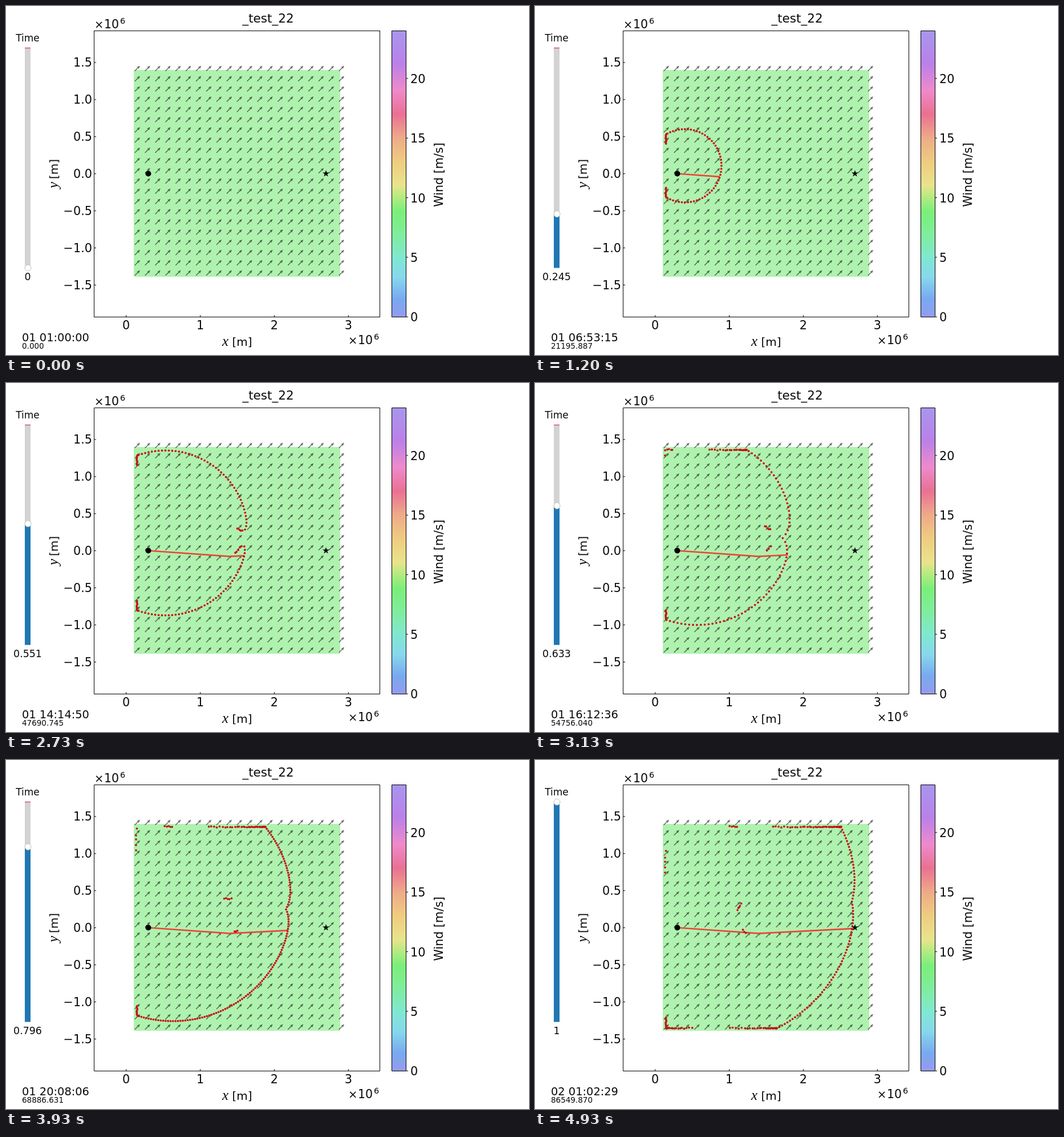
An HTML page with a canvas that plays this animation: 917 by 611 pixels, repeating every 5060 ms.

```html
<!DOCTYPE html>
<html lang="en">
<head>
<meta charset="utf-8">
<title>Wind routing front</title>
<style>
html, body { margin: 0; width: 100%; height: 100%; overflow: hidden; background: #fff; }
canvas { display: block; }
</style>
</head>
<body>
<canvas id="stage" width="917" height="611"></canvas>
<script>
const ctx = document.getElementById('stage').getContext('2d');
const LOOP = 5060, LAST = 49, DURATION = 86549.870;
const SANS = '"DejaVu Sans", sans-serif';
const MATH = 'italic 25px "Liberation Serif", serif';
const START = { x: 249.5, y: 293.5 }, GOAL = { x: 561, y: 293.5 };
const AREA = { left: 231, top: 116.8, bottom: 470 };
const UNIT = 129.85;

function text(str, x, y, size, align = 'left', font = size + 'px ' + SANS) {
  ctx.font = font;
  ctx.textAlign = align;
  ctx.fillStyle = '#0a0a0a';
  ctx.fillText(str, x, y);
}

function rotated(x, y, draw) {
  ctx.save();
  ctx.translate(x, y);
  ctx.rotate(-Math.PI / 2);
  draw();
  ctx.restore();
}

function line(x1, y1, x2, y2, color = '#000', width = 1) {
  ctx.strokeStyle = color;
  ctx.lineWidth = width;
  ctx.beginPath();
  ctx.moveTo(x1, y1);
  ctx.lineTo(x2, y2);
  ctx.stroke();
}

function disc(x, y, r, color) {
  ctx.fillStyle = color;
  ctx.beginPath();
  ctx.arc(x, y, r, 0, 2 * Math.PI);
  ctx.fill();
}

const dot = (x, y) => disc(x, y, 1.85, '#cb0c16');
const clamp = (v, low, high) => Math.max(low, Math.min(high, v));

// Repeatable offset in -1..1
function noise(i) {
  const s = Math.sin(i * 91.7 + 3.1) * 4375.5;
  return 2 * (s - Math.floor(s)) - 1;
}

function frameBox(x, y, w, h) {
  ctx.strokeStyle = '#000';
  ctx.lineWidth = 1;
  ctx.strokeRect(x, y, w, h);
}

function powerOfTen(x, y) {
  text('×', x - 2, y, 19.5);
  text('10', x + 15, y, 20.5);
  text('6', x + 43, y - 8, 14.5);
}

function drawArrows() {
  ctx.fillStyle = 'rgba(0, 0, 0, 0.58)';
  for (let row = 0; row < 21; row++) {
    for (let col = 0; col < 21; col++) {
      ctx.save();
      ctx.translate(225.8 + 17.9 * col, 113.8 + 17.9 * row);
      ctx.rotate(-Math.PI / 4);
      ctx.beginPath();
      ctx.moveTo(0, -0.7);
      ctx.lineTo(8.2, -0.7);
      ctx.lineTo(7.2, -2.5);
      ctx.lineTo(13, 0);
      ctx.lineTo(7.2, 2.5);
      ctx.lineTo(8.2, 0.7);
      ctx.lineTo(0, 0.7);
      ctx.fill();
      ctx.restore();
    }
  }
}

function drawColorbar() {
  const shade = ctx.createLinearGradient(0, 544, 0, 43);
  const stops = ['#949bee', '#78a9f0', '#86d8ec', '#80e8d0', '#7fed9a', '#7aef79',
    '#a8ec80', '#e8e48a', '#efcc80', '#eeaa88', '#ea7093', '#ee8acb', '#bb80e8', '#a796ee'];
  const values = [0, 1.5, 3.3, 5, 7, 8.8, 9.8, 11, 13, 15, 17, 19, 21.2, 24];
  stops.forEach((c, i) => shade.addColorStop(values[i] / 24, c));
  ctx.fillStyle = shade;
  ctx.fillRect(676.5, 43.5, 25, 501);
  frameBox(676.5, 43.5, 25, 501);
  for (let v = 0; v <= 20; v += 5) {
    const y = 544.3 - 20.87 * v;
    line(702, y, 705, y);
    text(v, 709, y + 8, 20.8);
  }
  rotated(766, 295.5, () => text('Wind [m/s]', 0, 0, 20.7, 'center'));
}

function drawChart() {
  ctx.fillStyle = '#fff';
  ctx.fillRect(0, 0, 917, 611);
  ctx.fillStyle = '#aff2af';
  ctx.fillRect(224, 112, 362, 362);
  drawArrows();
  frameBox(154.5, 43.5, 501, 501);
  for (let i = 0; i <= 3; i++) {
    const x = 210.7 + UNIT * i;
    line(x, 544, x, 541);
    text(i, x, 565.5, 20.8, 'center');
  }
  for (let i = -3; i <= 3; i++) {
    const y = 293.7 - UNIT * i / 2;
    line(155, y, 158, y);
    text((i / 2).toFixed(1).replace('-', '−'), 151, y + 7.5, 20.8, 'right');
  }
  powerOfTen(157, 39);
  powerOfTen(602, 592);
  text('_test_22', 459.5, 29, 21.5, 'center');
  text('x', 379, 595, 0, 'left', MATH);
  text('[m]', 396.5, 595, 20);
  rotated(91, 319, () => {
    text('y', 0, 0, 0, 'left', MATH);
    text('[m]', 16, 0, 20);
  });
  drawColorbar();
  text('Time', 38, 62, 17, 'center');
}

// Shortest decimal label that stays within a thousandth
function shortLabel(v) {
  let d = 3;
  while (d >= 0 && Math.abs(v - Number(v.toFixed(d))) < 1e-3) d--;
  return v.toFixed(d + 1);
}

function drawSlider(v) {
  const y = 458.5 - 385 * v;
  ctx.fillStyle = '#d3d3d3';
  ctx.fillRect(33, 73.5, 10, 385);
  line(33, 73.5, 43, 73.5, '#e0445f', 1.4);
  ctx.fillStyle = '#1f77b4';
  ctx.fillRect(33, y, 10, 458.5 - y);
  disc(38.5, y, 5.5, '#fff');
  ctx.strokeStyle = '#bfbfbf';
  ctx.lineWidth = 1;
  ctx.stroke();
  text(shortLabel(v), 38, 480, 17.4, 'center');
}

function drawClock(seconds) {
  const total = Math.floor(seconds) + 3600;
  const pad = n => String(Math.floor(n)).padStart(2, '0');
  const day = pad(1 + total / 86400);
  const clock = [total / 3600 % 24, total / 60 % 60, total % 60].map(pad).join(':');
  text(day + ' ' + clock, 28, 587, 19.4);
  text(seconds.toFixed(3), 28, 600, 13.5);
}

// Piecewise linear [x, y] from rows of [step, x, y]
function follow(keys, k) {
  let i = 0;
  while (i < keys.length - 2 && k > keys[i + 1][0]) i++;
  const a = keys[i], b = keys[i + 1], u = (k - a[0]) / (b[0] - a[0]);
  return [1, 2].map(j => a[j] + (b[j] - a[j]) * u);
}

// Dots shed where the front wraps around the calm spot
const UPPER = [
  [[19, 369, 254], [27, 414, 259], [35, 410, 254.5], [39, 395, 243], [49, 361, 252]],
  [[19, 363, 262], [27, 406, 254], [35, 401, 246], [39, 383, 242], [49, 355.5, 262]]
];
const LOWER = [
  [[19, 362.5, 285], [27, 401.5, 298], [35, 411, 290], [39, 400.5, 301], [49, 364, 298]],
  [[19, 369, 295], [27, 413.5, 285], [35, 414.5, 285], [39, 406, 298], [49, 370, 302]]
];

function drawShed([from, to], k, count) {
  const [ax, ay] = follow(from, k), [bx, by] = follow(to, k);
  for (let i = 0; i < count; i++) {
    const u = i / (count - 1);
    dot(ax + (bx - ax) * u + noise(i) * 0.6, ay + (by - ay) * u + noise(i + 9) * 0.9);
  }
}

// Row of dots along an edge, denser towards `dense`
function drawRow(sparse, dense, y, gap) {
  const n = Math.round(Math.abs(dense - sparse) / gap);
  for (let i = 0; i <= n; i++) {
    const u = 1 - (1 - i / n) ** 2;
    dot(sparse + (dense - sparse) * u + noise(i) * 0.9, y + noise(i + 40) * (1 - u) + noise(i + 70) * 0.4);
  }
}

function drawClump(y, dir, length) {
  for (let i = 0; i < 9; i++) {
    dot(229.8 + noise(i) * 0.8, y + dir * length * i / 8);
  }
}

function drawFront(k) {
  const cx = START.x + 1.11 * k, cy = START.y - 1.15 * k, r = 5.345 * k;
  const reach = d => Math.sqrt(Math.max(0, r * r - d * d));
  const count = Math.max(20, 76 * 2 ** Math.ceil(Math.log2(r / 84)));

  // The front splits on the calm spot, then closes to a notch that widens
  const split = k >= 16 && k < 31;
  const half = !split ? 0 : k < 19 ? 10 + (k - 16) * 3.3 : k < 27 ? 20 - (k - 19) * 0.75 : 14 - (k - 27) * 3.5;
  const mid = split ? 274 - (k - 19) * 0.4 : 266 - (k - 35) * 1.3;
  const depth = k < 31 ? clamp((k - 19) * 0.6, 0, 5) : clamp(15 - (k - 35) * 1.2, 10, 15);
  const width = split ? 8 : Math.max(16, 18 + (k - 39) * 2.5);

  for (let i = 0; i < count; i++) {
    const a = 2 * Math.PI * i / count;
    let x = cx + r * Math.cos(a);
    const y = cy + r * Math.sin(a);
    if (x < AREA.left || y < AREA.top || y > AREA.bottom) continue;
    if (x > cx) {
      const away = Math.abs(y - mid) - half;
      if (split && away < 0) continue;
      x -= depth * Math.exp(-Math.max(0, away) / width);
    }
    dot(x, y);
  }

  if (k >= 5) {
    const h = reach(cx - AREA.left), len = Math.min(17, h * 0.6);
    drawClump(Math.min(cy + h, 468), -1, len);
    if (k <= 28) drawClump(cy - h, 1, len);
  }
  if (k >= 16) {
    drawShed(UPPER, k, 5);
    drawShed(LOWER, k, k < 31 ? 5 : 3);
  }
  if (k >= 28) {
    const tail = 266 + 6.3 * (k - 35);
    const offsets = k < 37 ? [0, 2, 6, 9, 13, 22, 26, 31, 36] : [0, 3, 6, 9, 13];
    offsets.forEach((d, i) => {
      if (tail - d > 229) dot(tail - d, 116.6 + noise(i + 5));
    });
    [0, 12, 19, 29, 38].forEach((d, i) => {
      const y = 120 + d + 3.9 * (k - 39);
      if (y > 116) dot(i ? 228 : 229.5, y);
    });
    drawRow(330 + 6.2 * (k - 35), cx + reach(cy - AREA.top), 117.2, 2.7);
  }
  if (k >= 43) {
    const s = reach(AREA.bottom - cy);
    drawRow(293 - 3 * (k - 43), Math.max(230, cx - s), 469.5, 2.4);
    drawRow(Math.min(cx + s, 299 + 7 * (k - 43)), cx + s, 469.5, 3);
  }
}

function drawRoute(k) {
  const first = Math.min(k, 23), rest = Math.max(0, k - 23);
  const bx = START.x + 6.2 * first, by = START.y + 0.44 * first;
  ctx.strokeStyle = '#ee4438';
  ctx.lineWidth = 2.7;
  ctx.lineJoin = 'round';
  ctx.beginPath();
  ctx.moveTo(START.x, START.y);
  ctx.lineTo(bx, by);
  if (rest) ctx.lineTo(bx + 6.38 * rest, by - 0.33 * rest);
  ctx.stroke();
}

function drawStar(x, y, r) {
  ctx.fillStyle = '#000';
  ctx.beginPath();
  for (let i = 0; i < 10; i++) {
    const a = -Math.PI / 2 + i * Math.PI / 5, q = i % 2 ? r * 0.382 : r;
    ctx.lineTo(x + q * Math.cos(a), y + q * Math.sin(a));
  }
  ctx.fill();
}

// Steps last 130 and 70 ms in turn
function stepAt(ms) {
  const pair = Math.floor(ms / 200);
  return Math.min(LAST, 2 * pair + (ms - 200 * pair >= 130 ? 1 : 0));
}

let shown = -1;
const origin = performance.now();

function tick() {
  const k = stepAt((performance.now() - origin) % LOOP);
  if (k !== shown) {
    shown = k;
    drawChart();
    if (k > 0) {
      drawRoute(k);
      drawFront(k);
    }
    disc(START.x, START.y, 5, '#000');
    drawStar(GOAL.x, GOAL.y, 6.3);
    drawSlider(k / LAST);
    drawClock(DURATION * k / LAST);
  }
  requestAnimationFrame(tick);
}
tick();
</script>
</body>
</html>
```
